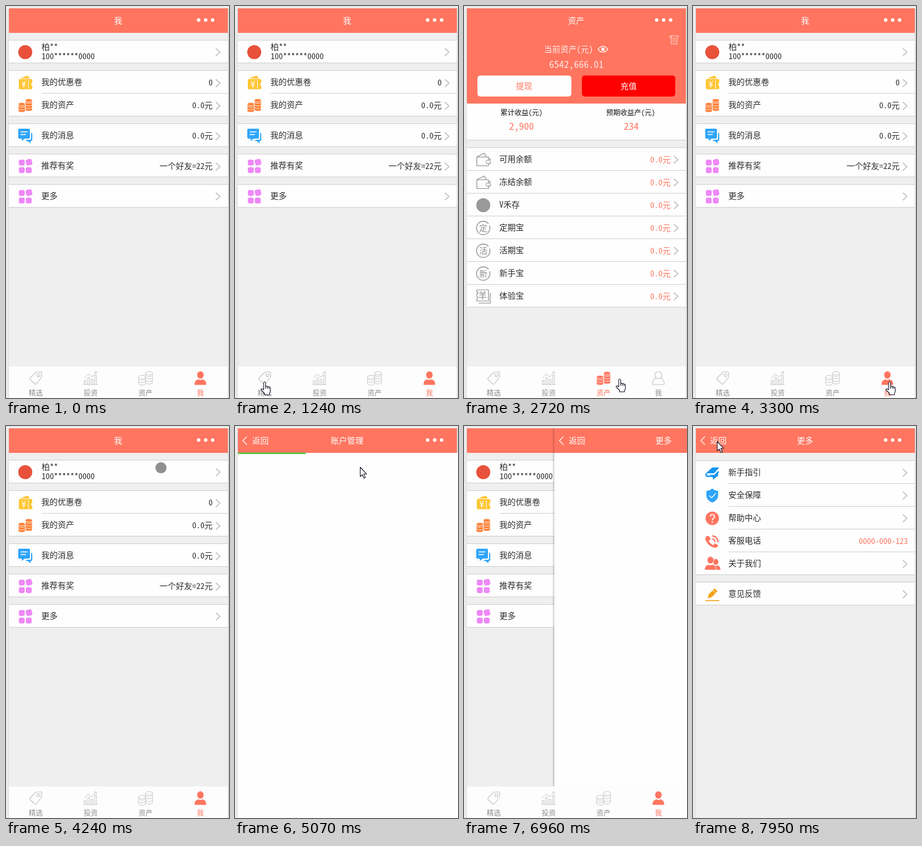
Animation, 382 px wide and 671 px high, one loop 8 s. Source, as an HTML page:

```html
<!DOCTYPE html>
<html lang="zh-CN">
<head>
<meta charset="utf-8">
<title>App walk-through</title>
<style>
  html, body { margin: 0; width: 100%; height: 100%; overflow: hidden; background: #ebebeb; }
  svg { display: block; width: 382px; height: 671px; --bg: #efefef; --row: #fefefe; }
  text { font-family: "Noto Sans Mono CJK SC", "Noto Sans CJK SC", "Noto Sans CJK", "Noto Sans", sans-serif; font-feature-settings: "hwid"; white-space: pre; }
  .flat { --bg: #f6f6f6; --row: #f6f6f6; }
</style>
</head>
<body>
<svg id="stage" viewBox="0 0 382 671"></svg>
<script>
const CORAL = '#ff7560', INK = '#2c2c2c', GREY = '#8c8c8c', PALE = '#c4c4c4';
const LOOP = 8000;

// ---- basic shapes ----
const rect = (x, y, w, h, fill, r = 0) =>
  `<rect x="${x}" y="${y}" width="${w}" height="${h}" rx="${r}" fill="${fill}"/>`;
const disc = (x, y, r, fill) => `<circle cx="${x}" cy="${y}" r="${r}" fill="${fill}"/>`;
const ring = (x, y, r, color, w = 1.2, extra = '') =>
  `<circle cx="${x}" cy="${y}" r="${r}" fill="none" stroke="${color}" stroke-width="${w}" ${extra}/>`;
const fillPath = (d, fill) => `<path d="${d}" fill="${fill}"/>`;
const line = (d, color, w = 1.2) =>
  `<path d="${d}" fill="none" stroke="${color}" stroke-width="${w}" stroke-linejoin="round"/>`;
const text = (x, y, s, fill = INK, size = 14, anchor = 'start') =>
  `<text x="${x}" y="${y}" font-size="${size}" fill="${fill}" text-anchor="${anchor}">${s}</text>`;
const at = (x, y, s) => `<g transform="translate(${x} ${y})">${s}</g>`;
const rule = (x, y, w = 380 - x) => rect(x, y, w, 1, '#cfcfcf');

// ---- icons, drawn around 0,0 ----
function stack(x, y, n, color, solid) {
  let s = '';
  for (let i = n - 1; i >= 0; i--) {
    const d = `M${x} ${y + i * 4.4}a6 2.7 0 0 1 12 0v2.6a6 2.7 0 0 1-12 0z`;
    s += solid
      ? `<path d="${d}" fill="${color}" stroke="#fff" stroke-width=".8"/>`
      : `<path d="${d}" fill="#fefefe" stroke="${color}"/>`;
  }
  return s + line(`M${x} ${y}a6 2.7 0 0 0 12 0`, solid ? '#fff' : color, .8);
}
const coins = (color, solid) =>
  stack(0, -8.5, 4, color, solid) + stack(-12, -2, 3, color, solid);

const head = (x, color) =>
  `<ellipse cx="${x}" cy="-5.5" rx="5.6" ry="6.3" fill="${color}"/>` +
  fillPath(`M${x - 10} 11.5c0-6 2-8 7-9.5q3 2.5 6 0c5 1.5 7 3.500 7 9.500z`, color);

const lock = line('M-6.500-1V-5a6.500 6.500 0 0 1 13 0V-1', '#0ab0f5', 3) +
  rect(-12, -2, 24, 14, '#0ab0f5', 2) + disc(0, 3.500, 2, '#fff') + rect(-.8, 4, 1.6, 4.500, '#fff');

const wallet = line('M-11-4.500H9V10.500H-11zM-10.500-5L2-11 5-5M9-1.500H12V1M9 6.500H12V4', GREY) +
  `<rect x="5" y="1" width="7" height="5.500" rx="2" fill="#fff" stroke="${GREY}"/>`;

const seal = ch => ring(0, 0, 11.5, GREY, 1.3, 'stroke-dasharray="64 4 4.25"') +
  text(0, 5, ch, GREY, 14, 'middle');

const icons = {
  avatar: disc(0, 0, 12, '#e9513a'),
  coupon: fillPath('M-9-7L4-12 8-7z', '#ffc532') + rect(-11, -6, 23, 17.500, '#ffc532', 2) +
    disc(12.500, 3, 2.500, '#fff') + line('M5.500-4V10', '#fff', 1) +
    line('M-6-3L-2.500 2 1-3M-2.500 2V9M-6 2.500H1M-6 5.500H1', '#fff', 1.2),
  coins: coins('#ff8037', true),
  chat: fillPath('M-10-12H6q2 0 2 2V3q0 2-2 2H-1L-6 9V5H-10q-2 0-2-2V-10q0-2 2-2z', '#2fa5fb') +
    line('M-8-6.500H4M-8-2H1', '#fff', 1.6) +
    fillPath('M10-5q2 0 2 2V7q0 2-2 2H9v4L4 9H0L3 7H8q2 0 2-2z', '#2fa5fb'),
  grid: rect(-11, -11, 10, 10, '#ee88f8', 3) + rect(-11, 2, 10, 10, '#ee88f8', 3) +
    rect(1, 2, 10, 10, '#ee88f8', 3) +
    `<g transform="rotate(-12 6.500 -6.500)">${rect(1.200, -11.800, 10.500, 10.500, '#ee88f8', 3)}</g>`,
  wallet,
  plain: disc(0, 0, 12, '#999'),
  fixed: seal('定'),
  current: seal('活'),
  fresh: seal('新'),
  ticket: line('M-11-11H9V8H-11V4L-9 2-11 0V-4L-9-6-11-8zM12-6V11.500H-8', GREY) +
    text(-1, 4, '羊', GREY, 15, 'middle'),
  face: ring(0, 0, 11, '#f47361', 2) + `<g transform="translate(0 1) scale(.67)">${head(0, '#f47361')}</g>`,
  idName: head(-2, '#f47361') + rect(2, 2, 11, 10, 'var(--row)') +
    line('M4 4H12M4 7.500H12M4 11H12', '#f47361', 1.600),
  user: head(0, '#f47361'),
  idCard: rect(-12, -8, 24, 16, '#f47361', 2) + disc(-5.500, -2, 2.500, '#fff') +
    fillPath('M-10 5q0-4 4.500-4T-1 5z', '#fff') + line('M2-3H9M2 0H9M2 3H9', '#fff'),
  phone: rect(-9, -12, 18, 24, '#f47361', 2) + rect(-7, -9, 14, 16, '#fff') + disc(0, 9.500, 1.300, '#fff'),
  mail: rect(-12, -9, 24, 18, '#f47361', 1) + line('M-12-8L0 2 12-8M-12 9L-4 0M12 9L4 0', '#fff'),
  lock,
  card: rect(-12, -8, 24, 16, '#f8b714', 2) + line('M-12-2.500H12', '#fff', 2) +
    line('M-1 2.500H9M4 5.500H9', '#fff'),
  guide: fillPath('M-11 1L0-9H12L3 1z', '#1296f3') +
    line('M-10 1q-2 5 2 5H3L11-2', '#1296f3', 2.500) + fillPath('M-4 3L4 4 10 0V5L1 12V8z', '#1296f3'),
  shield: fillPath('M0-12Q5-8 10-8V0C10 6 5 10 0 12-5 10-10 6-10 0V-8Q-5-8 0-12z', '#2ea4fa') +
    line('M-5 0L-1 4 6-4', '#fff', 1.400),
  help: disc(0, 0, 11.500, CORAL) + line('M-3.500-3a3.600 3.600 0 1 1 5.500 3Q0 1.500 0 3.500', '#fff', 1.800) +
    disc(0, 6.500, 1.200, '#fff'),
  call: fillPath('M-9-9L-5-8-3-3-6 0Q-3 5 2 7L4 4 9 6 10 9Q6 13 0 10-9 6-12-3-12-7-9-9z', CORAL) +
    line('M0-4Q4-3 5 2M0-9Q9-8 10 2', CORAL, 2.300),
  people: `<g transform="translate(6 1) scale(.8)">${head(0, CORAL)}</g>` +
    `<g transform="translate(-3 -1)" stroke="#fff" stroke-width=".8">${head(0, CORAL)}</g>`,
  pencil: fillPath('M-8 7L-6 0 4-10 9-5-1 5z', '#f8a21c') + line('M1-7L6-2', '#fff', 1) +
    rect(-12, 10, 24, 1.600, '#f8a21c')
};

// ---- list rows ----
const chevron = y => line(`M359.500 ${y - 6.500}L366.500 ${y} 359.500 ${y + 6.500}`, '#c9c9cc', 2);

function row(y, [icon, label, value, color = INK, arrow = true]) {
  const c = y + 20;
  let s = at(33, c + 1, icons[icon]);
  s += Array.isArray(label)
    ? text(61, c - 3, label[0]) + text(61, c + 13, label[1])
    : text(60.500, c + 5, label);
  if (value) s += text(arrow ? 354 : 368, c + 6, value, color, 14, 'end');
  if (arrow) s += chevron(c + (value && color === INK ? 2 : 1));
  return s;
}
function group(y, rows, inset = 61) {
  const h = rows.length * 39;
  let s = rect(5, y, 375, h, 'var(--row)') + rule(5, y) + rule(5, y + h);
  rows.forEach((r, i) => {
    if (i) s += rule(inset, y + i * 39);
    s += row(y + i * 39, r);
  });
  return s;
}
function groups(y, list) {
  return list.map(rows => {
    const s = group(y, rows);
    y += rows.length * 39 + 13;
    return s;
  }).join('');
}

// ---- screens ----
const header = (title, back) => rect(5, 4, 375, 42, CORAL) +
  text(192, 30, title, '#fff', 14, 'middle') +
  [330, 342, 354].map(x => disc(x, 24, 3, '#fff')).join('') +
  (back ? line('M20.500 18L13.500 25 20.500 32', '#fff', 1.200) + text(29.500, 30, '返回', '#fff') : '');
const body = (w = 375) => rect(5, 46, w, 625, 'var(--bg)');

const meList = groups(58, [
  [['avatar', ['柏**', '100******0000']]],
  [['coupon', '我的优惠卷', '0'], ['coins', '我的资产', '0.0元']],
  [['chat', '我的消息', '0.0元']],
  [['grid', '推荐有奖', '一个好友=22元']],
  [['grid', '更多']]
]);
const accountList = groups(59, [
  [['face', '头像'], ['idName', '真实姓名'], ['user', '用户名']],
  [['idCard', '身份认证'], ['phone', '手机号码'], ['mail', '电子邮箱']],
  [['lock', '登录密码'], ['lock', '交易密码'], ['lock', '手势密码']],
  [['card', '银行卡']]
]);
const moreList = groups(59, [
  [['guide', '新手指引'], ['shield', '安全保障'], ['help', '帮助中心'],
   ['call', '客服电话', '0000-000-123', CORAL, false], ['people', '关于我们']],
  [['pencil', '意见反馈']]
]);

const assetRows = [['wallet', '可用余额'], ['wallet', '冻结余额'], ['plain', 'V禾存'], ['fixed', '定期宝'],
  ['current', '活期宝'], ['fresh', '新手宝'], ['ticket', '体验宝']].map(r => [...r, '0.0元', CORAL]);
const assetTop = rect(5, 46, 375, 121, CORAL) +
  at(360, 58, line('M-5-7H7V-4H5V7H-5zM-5-7H-7V-4H-5M-3-3H3M-3 0H3M-3 3H3', '#ffd9d2', 1.100)) +
  text(137, 79, '当前资产(元)', '#ffefec') +
  at(238, 74, line('M-8.500 0Q0-10 8.500 0 0 10-8.500 0z', '#ffefec', 1.400) + disc(0, 0, 3, '#ffefec')) +
  text(192.500, 106, '6542,666.01', '#ffe6e1', 17, 'middle') +
  rect(23, 119, 161, 36, '#fefefe', 5) + text(103, 142, '提现', CORAL, 14, 'middle') +
  rect(202, 119, 160, 36, '#fe0000', 5) + text(282, 142, '充值', '#fff', 14, 'middle') +
  rect(5, 167, 375, 62, '#fefefe') + rule(5, 229) +
  text(98.500, 187, '累计收益(元)', '#111', 12, 'middle') + text(285.500, 187, '预期收益产(元)', '#111', 12, 'middle') +
  text(98.500, 212, '2,900', CORAL, 17, 'middle') + text(286.500, 212, '234', CORAL, 17, 'middle');

const screens = {
  me: header('我') + body() + meList,
  pick: header('精选') + body(),
  invest: header('投资') + body(),
  asset: header('资产') + body() + assetTop + group(242, assetRows, 5)
};
const subs = {
  account: { title: '账户管理', list: accountList },
  more: { title: '更多', list: moreList }
};

// ---- tab bar ----
const tabIcons = [
  c => line('M0-10L8-11Q10-11 10-9V-2L1 10Q0 11-1.500 10L-10 2Q-11 1-10 0z', c) + ring(4.500, -5, 2.500, c),
  c => line('M-11 11V4H-8V11M-5 11V-1H-2V11M1 11V2H4V11M7 11V-5H10V11M-12 11H12M-11 0L-4-7 2-2 10-11M6-10L10-11 10-7', c, 1),
  (c, on) => coins(c, on),
  (c, on) => on ? head(0, c)
    : ring(0, -5, 6, c) + line('M-4-.500C-8 2-10 4-10 11H10C10 4 8 2 4-.500', c)
];
const tabOrder = ['pick', 'invest', 'asset', 'me'];
function tabs(active, bg = '#fdfdfd') {
  return rect(5, 617, 375, 54, bg) + ['精选', '投资', '资产', '我'].map((label, i) => {
    const x = 51 + i * 94, on = tabOrder[i] === active;
    return at(x, 637, tabIcons[i](on ? CORAL : PALE, on)) +
      text(x, 667, label, on ? CORAL : GREY, 12, 'middle');
  }).join('');
}

// ---- pointer ----
const outline = 'fill="#fff" stroke="#15152a" stroke-width="1.100" stroke-linejoin="round"';
const pointers = {
  hand: `<path ${outline} d="M5 14V2.500q0-2 1.700-2t1.700 2V8q2-1 3 .5 2-.8 2.700.8 2.400-.5 2.400 2V16q0 2-1.500 4v2.500H6.500V20L1 14.500q-1-2 .8-2.500 1.200 0 3.200 2zM8.400 8v4M11.400 8.500V12M14.100 9.500V12.500"/>`,
  arrow: `<path ${outline} d="M.5.5V16.500L4 13.300 6.800 19.300 9.300 18.200 6.600 12.300H11.500z"/>`,
  dot: disc(0, 0, 9.500, '#8f8f8f')
};

// time, screen, pointer, x, y, options
const steps = [
  [0, 'me'],
  [430, 'me', 'hand', 231, 666],
  [580, 'me', 'hand', 140, 648],
  [700, 'me', 'hand', 68, 637],
  [850, 'me', 'hand', 52, 641],
  [970, 'me', 'hand', 44, 643],
  [1360, 'pick', 'hand', 44, 643],
  [1480, 'pick', 'hand', 125, 648],
  [1630, 'pick', 'hand', 138, 645],
  [1750, 'pick', 'hand', 145, 643],
  [2050, 'invest', 'hand', 145, 643],
  [2290, 'invest', 'hand', 205, 643],
  [2410, 'invest', 'hand', 250, 640],
  [2720, 'asset', 'hand', 260, 638],
  [2870, 'asset', 'hand', 317, 642],
  [3020, 'asset', 'hand', 330, 643],
  [3300, 'me', 'hand', 330, 643],
  [3420, 'me', 'dot', 308.5, 606.5],
  [3790, 'me', 'dot', 306.5, 467.5],
  [3940, 'me', 'dot', 259.5, 134.5],
  [4090, 'me', 'dot', 256.5, 94.5],
  [4240, 'me', 'dot', 265.5, 71.5],
  [4800, 'account', '', 0, 0, { enter: 98 }],
  [4950, 'account', 'arrow', 250, 74, { load: 40 }],
  [5070, 'account', 'arrow', 214, 70, { load: 116 }],
  [5190, 'account', 'arrow', 150, 56, { load: 230 }],
  [5310, 'account', 'arrow', 86, 38, { ready: true, load: 330 }],
  [5430, 'account', 'arrow', 48, 26, { ready: true }],
  [5550, 'account', 'arrow', 38, 23, { ready: true }],
  [5820, 'account', 'arrow', 38, 23, { leave: 150 }],
  [5940, 'account', 'arrow', 38, 23, { leave: 332 }],
  [6090, 'me', 'arrow', 130, 90],
  [6210, 'me', 'dot', 221.5, 169.5],
  [6360, 'me', 'dot', 245.5, 274.5],
  [6510, 'me', 'dot', 196.5, 332.5],
  [6660, 'me', 'dot', 194.5, 334.5],
  [6960, 'more', '', 0, 0, { enter: 150 }],
  [7080, 'more', '', 0, 0, { enter: 0 }],
  [7230, 'more', 'arrow', 170, 270, { load: 60 }],
  [7350, 'more', 'arrow', 120, 150, { load: 150 }],
  [7470, 'more', 'arrow', 70, 60, { ready: true, load: 300 }],
  [7590, 'more', 'arrow', 42, 32, { ready: true }],
  [7710, 'more', 'arrow', 36, 28, { ready: true }],
  [7950, 'more', 'arrow', 41, 26, { ready: true }]
];

function subView(name, { enter, leave, load, ready }) {
  const { title, list } = subs[name];
  const blank = rect(5, 46, 377, 625, '#fefefe');
  if (enter !== undefined) {
    const edge = enter ? rect(2, 4, 3, 667, 'rgba(0,0,0,.12)') : '';
    return screens.me + at(enter, 0, edge + header(title, true) + blank) + tabs('me');
  }
  if (leave !== undefined) {
    return `<g class="flat">${screens.me}${tabs('me', 'var(--bg)')}` +
      at(leave, 0, rect(4, 46, 1, 625, '#e6e6e6') + body(377) + list) + '</g>';
  }
  return header(title, true) + (ready ? body() + list : blank) +
    (load ? rect(5, 45.5, load, 2.5, '#4fc83c') : '');
}

function render([, name, pointer, x, y, opts = {}]) {
  const view = screens[name] ? screens[name] + tabs(name) : subView(name, opts);
  return rect(0, 0, 382, 671, '#ebebeb') + rect(4, 4, 1, 667, '#dedede') + rect(380, 4, 2, 667, '#d9d9d9') +
    view + (pointer ? at(x, y, pointers[pointer]) : '');
}

const stage = document.getElementById('stage');
let shown = null;
function tick() {
  const t = performance.now() % LOOP;
  const step = steps.findLast(s => s[0] <= t);
  if (step !== shown) {
    shown = step;
    stage.innerHTML = render(step);
  }
  requestAnimationFrame(tick);
}
tick();
</script>
</body>
</html>
```
